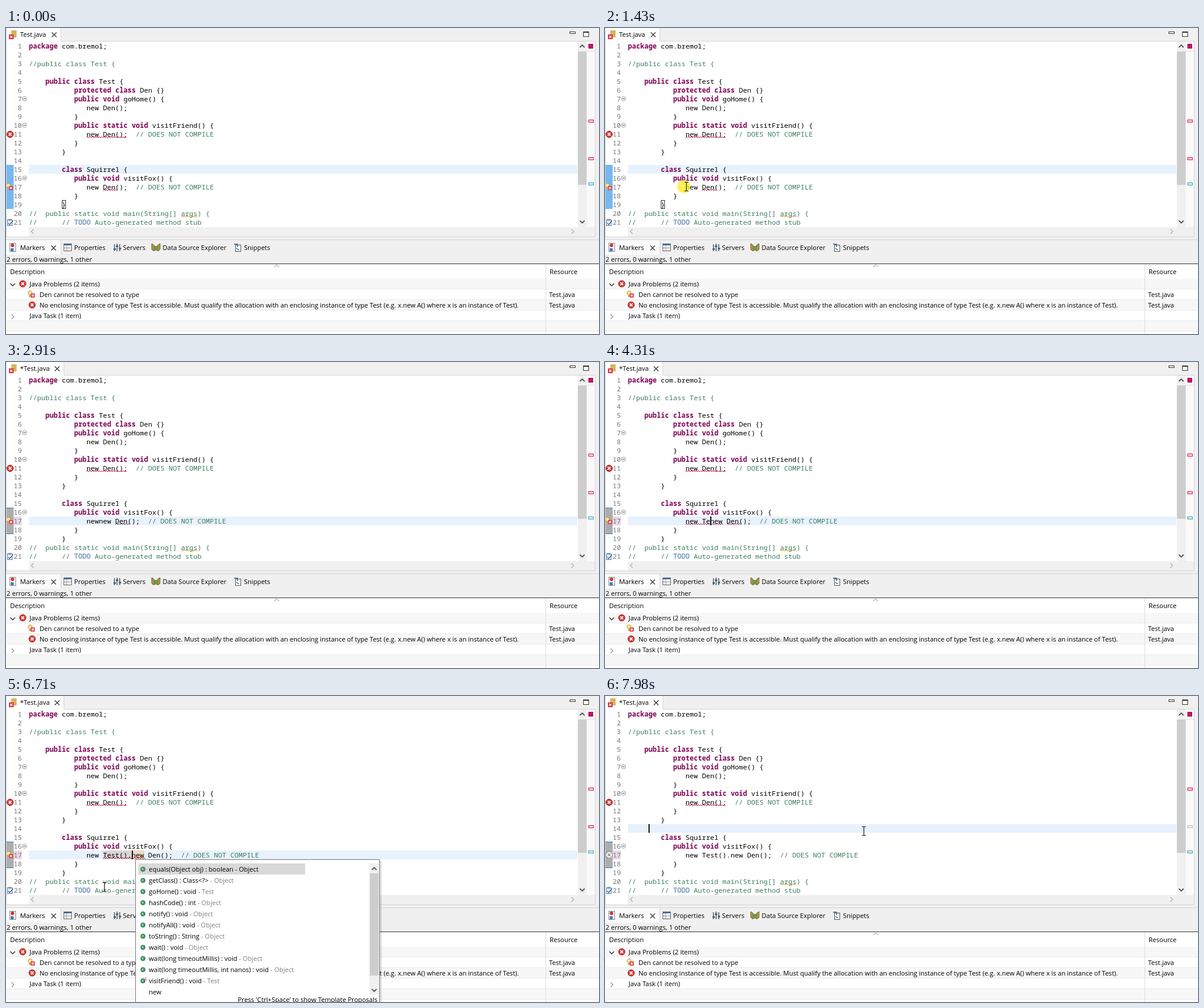
Recreate the animation shown at these times as an HTML page. Size 1009 by 521 pixels, loop 8 s.

```html
<!DOCTYPE html>
<html lang="en">
<head>
<meta charset="utf-8">
<title>Editor</title>
<style>
html, body { margin: 0; width: 100%; height: 100%; overflow: hidden; background: #f0f0f0; }
svg { display: block; width: 100vw; height: 100vh; }
text { white-space: pre; font: 11.05px "Open Sans", "Noto Sans", sans-serif; fill: #000; }
.m { font: 11.667px "Noto Sans Mono", "DejaVu Sans Mono", monospace; }
.k { font-weight: 700; fill: #7f0055; }
.c { fill: #3f7f5f; }
.todo { fill: #7f9fbf; font-weight: 700; }
.g { fill: #808080; }
.n { fill: #787878; }
.i { font-style: italic; }
</style>
</head>
<body>
<svg id="stage" viewBox="0 0 1009 521" preserveAspectRatio="none"></svg>
<script>
const LOOP = 8000, RED = '#d4145a';
const stage = document.getElementById('stage');

const esc = s => s.replace(/&/g, '&amp;').replace(/</g, '&lt;');
const span = (cls, s) => `<tspan class="${cls}">${s}</tspan>`;
const text = (x, y, s, cls = '', more = '') => `<text x="${x}" y="${y}" class="${cls}" ${more}>${s}</text>`;
const rect = (x, y, w, h, fill, stroke = 'none') =>
  `<rect x="${x}" y="${y}" width="${w}" height="${h}" fill="${fill}" stroke="${stroke}"/>`;
const path = (d, stroke, w = 1, fill = 'none') =>
  `<path d="${d}" stroke="${stroke}" stroke-width="${w}" fill="${fill}"/>`;
const disc = (x, y, r, fill, stroke = 'none') =>
  `<circle cx="${x}" cy="${y}" r="${r}" fill="${fill}" stroke="${stroke}"/>`;
const cross = (x, y, r, color, w) => path(`M${x - r} ${y - r}l${2 * r} ${2 * r}m0 ${-2 * r}l${-2 * r} ${2 * r}`, color, w);
const chevron = (x, y, dx, dy, color, w = 1.4) => // points towards (dx, dy)
  path(`M${x - 2 * dx - 4 * dy} ${y - 2 * dy - 4 * dx}L${x + 2 * dx} ${y + 2 * dy}L${x - 2 * dx + 4 * dy} ${y - 2 * dy + 4 * dx}`, color, w);
const squiggle = (x1, x2, y, color) => {
  let d = `M${x1} ${y}`;
  for (let x = x1; x < x2; x += 4) d += 'l2 -2l2 2';
  return path(d, color);
};

const rowTop = n => 8 + 15 * n;
const col = c => 39 + 7 * c;

const CODE = `package com.bremol;

//public class Test {

    public class Test {
           protected class Den {}
           public void goHome() {
              new Den();
           }
           public static void visitFriend() {
              new Den();  // DOES NOT COMPILE
           }
        }

        class Squirrel {
           public void visitFox() {
              @new Den();  // DOES NOT COMPILE
           }
        }
//  public static void main(String[] args) {
//      // TODO Auto-generated method stub`.split('\n');

const paint = s => s.replace(/\/\/.*|\b(?:package|public|protected|static|class|void)\b/g,
  m => m[0] === '/' ? span('c', m.replace('TODO', span('todo', 'TODO'))) : span('k', m));

// Time at which each character of the insertion is typed
const TYPED = 'new Test().';
const KEYS = [2230, 2300, 2370, 3380, 4040, 4310, 4510, 4710, 6050, 6240, 6570];
const typedCount = t => KEYS.filter(k => k <= t).length;

// Popup opens, its documentation opens, the code is checked again, popup closes
const POPUP = 6710, DOCS = 7180, CHECKED = 7250, CLOSED = 7790;

const PROPOSALS = ['equals(Object obj) : boolean - Object', 'getClass() : Class<?> - Object', 'goHome() : void - Test',
  'hashCode() : int - Object', 'notify() : void - Object', 'notifyAll() : void - Object', 'toString() : String - Object',
  'wait() : void - Object', 'wait(long timeoutMillis) : void - Object',
  'wait(long timeoutMillis, int nanos) : void - Object', 'visitFriend() : void - Test', 'new'];

// `code` and *emphasis*; a leading dash is a bullet
const DOC = [[292, 'Indicates whether some other object is "equal to" this one.'],
  [320, 'The `equals` method implements an equivalence relation on non-null object'],
  [336, 'references:'],
  [364, '-It is *reflexive*: for any non-null reference value `x`, `x.equals(x)` should'],
  [381, ' return `true`.'],
  [398, '-It is *symmetric*: for any non-null reference values `x` and `y`, `x.equals(y)`'],
  [414, ' should return `true` if and only if `y.equals(x)` returns `true`.'],
  [431, '-It is *transitive*: for any non-null reference values `x`, `y`, and `z`, if `x.equals`'],
  [447, ' `(y)` returns `true` and `y.equals(z)` returns `true`, then `x.equals(z)`'],
  [464, ' should return `true`.'],
  [480, '-It is *consistent*: for any non-null reference values `x` and `y`, multiple'],
  [497, ' invocations of `x.equals(y)` consistently return `true` or consistently'],
  [513, ' return `false`, provided no information used in `equals` comparisons']];

// Pointer way points: time, x, y
const WAY = [[110, 352, 490], [330, 300, 420], [600, 215, 250], [870, 170, 214], [1080, 150, 245], [1360, 138, 270],
  [1530, 138, 270], [1640, 167, 325], [7040, 167, 325], [7320, 330, 160], [7460, 420, 130], [7700, 441, 230], [7850, 440, 230]];

function pointerAt(t) {
  if (t < 110 || (t >= 2230 && t < POPUP)) return null;
  t = 110 + Math.floor((t - 110) / 69 + 0.02) * 69;
  const i = WAY.findIndex(p => p[0] > t);
  if (i < 0) return [440, 230];
  const a = WAY[Math.max(0, i - 1)], b = WAY[i];
  const u = Math.max(0, (t - a[0]) / (b[0] - a[0])), e = u * u * (3 - 2 * u);
  return [1, 2].map(k => Math.round(a[k] + (b[k] - a[k]) * e));
}

const errorIcon = (x, y, r = 5.5) => disc(x, y, r, '#d63a34', '#a82020') + cross(x, y, r * 0.42, '#fff', 1.7);
const bulbError = (x, y) => disc(x - 2, y - 2, 3.5, '#fbe3a0', '#c8963c') + rect(x - 4, y + 2, 4, 3, '#c8a870') +
  rect(x - 1, y - 1, 7, 7, '#dc3c3c') + cross(x + 2.5, y + 2.5, 1.8, '#fff', 1.3);

function tabBar(dirty) {
  const w = dirty ? 98 : 93;
  return rect(0, 0, 1009, 23, '#f0f0f0') + rect(0, 0, w, 23, '#fff') +
    path(`M${w + .5} 0V22.5H1002.5V355.5H.5V0`, '#d5d5d5') +
    rect(9, 4, 9, 12, '#d9b45c') + rect(5, 11, 8, 8, '#d8283c') + cross(9, 15, 2, '#fff', 1.4) +
    text(24, 15, (dirty ? '*' : '') + 'Test.java') + cross(w - 11, 11.5, 4, '#333', 1.2) +
    rect(959.5, 6.5, 9, 3, '#fff', '#333') + rect(982.5, 6.5, 9, 8, '#fff', '#333') + rect(982, 6, 10, 2, '#333');
}

function gutter(t) {
  let s = t < 2030 ? rect(1, 233, 12, 75, 'url(#blue)')
    : rect(1, 248, 12, 45, 'url(#gray)') + path('M1 248.5h12M1 292.5h12', '#1e82d2');
  if (t >= KEYS[0]) s += rect(13, 263, 14, 15, '#e8d9e6');
  CODE.forEach((_, i) => s += text(27, rowTop(i + 1) + 12, i + 1, 'm n', 'text-anchor="end"'));
  for (const n of [7, 10, 16])
    s += disc(31.5, rowTop(n) + 7.5, 3.6, '#fff', '#8c9aa6') + path(`M29.5 ${rowTop(n) + 7.5}h4`, '#555');
  s += errorIcon(7, 181);
  s += t < CHECKED ? bulbError(6, 270) : disc(7, 270.5, 5.5, '#f4f4f4', '#888') + cross(7, 270.5, 2.3, '#777', 1.2);
  s += rect(2.5, 326.5, 8, 10, '#e9f1fa', '#5a7fa8') + rect(4, 325, 5, 3, '#8a9aa8') + path('M4 332l2 3l6-7', '#2a62a0', 1.3);
  return s;
}

// Error underlines on the line being typed
function underlines(t) {
  if (t >= CHECKED) return '';
  const n = typedCount(t), end = col(14 + n + 3), den = n ? end + 7 : 165;
  let s = '';
  if (t < 5650) s += squiggle(den, den + 21, 277, n && t < 3380 ? '#555' : RED);
  if (t >= 3110) s += squiggle(t < 5650 ? 137 : 165, end, 277, RED);
  return s;
}

function caret(t) {
  if (t >= 7980) return rect(74, 218, 2, 15, '#111');
  if (t < 1530 || t >= CLOSED) return '';
  const n = typedCount(t);
  const on = n ? t - KEYS[n - 1] < 530 || t >= 7630 : t < 1960;
  return on ? rect(col(14 + n), 263, 2, 15, t > 7600 ? '#2222b0' : '#111') : '';
}

function editor(t) {
  const active = t < 1530 ? 15 : t < 7850 ? 17 : 14;
  const typed = TYPED.slice(0, typedCount(t));
  let s = rect(1, 23, 1001, 332, '#fff') + rect(39, rowTop(active), 933, 15, '#e8f2fe') + gutter(t);
  if (t >= POPUP && t < 7040) s += rect(165, 263, 49, 15, '#d6d6d6') + rect(214, 263, 21, 15, '#ead9c4');
  const flash = t >= CHECKED && t < CLOSED;
  if (flash) s += rect(214, 263, 21, 15, '#ff0');
  CODE.forEach((line, i) => {
    const shown = paint(line.replace('@', typed));
    s += text(39, rowTop(i + 1) + 12, flash && i === 16 ? shown.replace('.new', '.<tspan fill="#c83c00">new</tspan>') : shown, 'm');
  });
  s += squiggle(137, 203, 187, RED) + underlines(t) + squiggle(298, 326, 322, '#e0a030');
  if (t < 1530) s += rect(95.5, 293.5, 6, 14, 'none', '#333');
  s += caret(t);
  // Scroll bars and overview ruler
  s += rect(973, 23, 15, 316, '#f0f0f0') + rect(973, 40, 15, 227, '#cdcdcd') +
    chevron(980.5, 31, 0, -1, '#555', 1.8) + chevron(980.5, 330, 0, 1, '#555', 1.8) +
    rect(39, 339, 934, 16, '#f0f0f0') + rect(973, 339, 29, 16, '#f0f0f0') + rect(988, 23, 14, 316, '#fafafa') +
    chevron(45, 346.5, -1, 0, '#b4b4b4') + chevron(964, 346.5, 1, 0, '#b4b4b4') +
    path('M988 39.5h14', '#e0e0e0') + rect(991.5, 27.5, 7, 7, '#c8106c', '#a00c58') +
    rect(991.5, 156.5, 8, 4, '#ffd2e2', RED) +
    rect(991.5, 220.5, 8, 4, ...(t < CHECKED ? ['#ffd2e2', RED] : ['#eee', '#bbb'])) +
    rect(991.5, 263.5, 8, 4, '#d2f2f6', '#3fa0b4');
  return s;
}

function panel(hover) {
  let s = rect(0, 356, 1009, 165, '#f0f0f0') + rect(0, 361, 93, 25, '#fafafa') +
    path('M0 360.5H1009M93.5 361V386', '#d5d5d5') + rect(0, 402, 1009, 119, '#fff') + path('M0 401.5H1009', '#333');
  for (let i = 0; i < 6; i++) {
    const y = 427 + 18 * i;
    const fill = i === hover ? '#e5f3ff' : i % 2 ? '#fff' : '#f7f7f7';
    s += rect(1, y, 1008, 18, fill) + path(`M1 ${y + 17.5}H1009`, '#ececec');
  }
  s += path('M918.5 402V521', '#dcdcdc') + chevron(460.5, 405, 0, -1, '#777', 1);
  // Tab icons
  s += rect(6.5, 366.5, 10, 14, '#fff', '#889') + disc(11, 370, 3, '#d03038') + rect(8, 375, 5, 5, '#4a78b4') +
    rect(98.5, 367.5, 13, 12, '#fff', '#666') + rect(98, 367, 14, 3, '#4a6a9a') + path('M103.5 370v9M99 374.5h12', '#999') +
    path('M184.5 368v12M189 367v13M193.5 368v12', '#444', 1.3) + rect(183, 375, 4, 3, '#46688c') + rect(187, 370, 4, 3, '#46688c') + rect(192, 374, 4, 3, '#46688c') +
    path('M248 367l4 3v10l-4-3zM262 367l-4 3v10l4-3z', '#6a5420', 1, '#c09a3c') + rect(252, 371, 6, 8, '#6a9a58') +
    rect(390.5, 369.5, 9, 11, '#fff', '#555') + path('M388 368h6v5M392 375l4 3', '#3264a0', 1.5);
  s += text(24, 378, 'Markers') + cross(81, 374.5, 4, '#333', 1.2) + text(116, 378, 'Properties') + text(199, 378, 'Servers') +
    text(266.5, 378, 'Data Source Explorer') + text(405, 378, 'Snippets') + text(1, 398, '2 errors, 0 warnings, 1 other') +
    text(7, 419, 'Description') + text(925, 419, 'Resource') +
    chevron(11.5, 437, 0, 1, '#333') + errorIcon(28.5, 435.5) + text(40, 440, 'Java Problems (2 items)') +
    bulbError(43, 453) + text(57, 458, 'Den cannot be resolved to a type') + text(924, 458, 'Test.java') +
    errorIcon(44.5, 471.5) + text(57, 476, 'No enclosing instance of type Test is accessible. Must qualify the allocation with an enclosing instance of type Test (e.g. x.new A() where x is an instance of Test).') +
    text(924, 476, 'Test.java') + chevron(11.5, 491.5, 1, 0, '#999') + text(40, 494, 'Java Task (1 item)');
  return s;
}

function proposals() {
  let s = rect(222, 281, 417, 240, '#0002') + rect(220.5, 278.5, 415, 250, '#fff', '#777') + rect(225, 285, 284, 19, '#d9d9d9');
  PROPOSALS.forEach((p, i) => {
    const y = 295 + 19 * i, [head, owner] = p.split(' - ');
    if (owner) s += disc(233, y, 3.8, '#4f9a6c', '#2f7350') + disc(232.4, y - .6, 1.5, '#9fd0b0');
    if (i === 10) s += text(236, y - 1, 'S', '', 'style="font-size:7px;fill:#a33"');
    s += text(243, y + 4, esc(head) + (owner ? span(i ? 'g' : '', ' - ' + owner) : ''));
  });
  return s + rect(618, 285, 16, 224, '#f0f0f0') + rect(619, 302, 15, 174, '#cdcdcd') +
    chevron(626.5, 294, 0, -1, '#555', 1.8) + chevron(626.5, 501, 0, 1, '#555', 1.8) +
    text(632, 521, "Press 'Ctrl+Space' to show Template Proposals", '', 'text-anchor="end"');
}

function docs() {
  let s = rect(641.5, 278.5, 400, 260, '#ffffe1', '#777');
  for (const [y, line] of DOC) {
    const inset = /^[- ]/.test(line);
    if (line[0] === '-') s += disc(659, y - 4, 2, '#000');
    s += text(inset ? 670 : 646, y, (inset ? line.slice(1) : line)
      .replace(/`(.*?)`/g, (_, c) => span('m', c)).replace(/\*(.*?)\*/g, (_, c) => span('i', c)));
  }
  return s + rect(642, 516, 367, 5, '#ffffe1') + path('M642 515.5H1009', '#d8d8c0') +
    text(822, 527, "Press 'Tab' from proposal table or click for focus", 'g');
}

function pointer([x, y], t) {
  const overPopup = t >= POPUP && t < CLOSED && x > 220 && y > 278;
  let s = '';
  if ((t >= 1400 && t < 1600) || (t >= CLOSED && t < 7980)) s += disc(x - 4, y, 11, '#ffee28cc');
  return s + (y < 339 && !overPopup
    ? path(`M${x - 3} ${y - 7.5}h2.5l1 1l1-1h2.5M${x + .5} ${y - 7}v14M${x - 3} ${y + 7.5}h2.5l1-1l1 1h2.5`, '#222', 1.2)
    : path(`M${x} ${y}v16l4-4l3 6l2-1l-3-6h5z`, '#000', 1, '#fff'));
}

const check = (id, a, b) => `<pattern id="${id}" width="2" height="2" patternUnits="userSpaceOnUse">` +
  rect(0, 0, 2, 2, a) + rect(0, 0, 1, 1, b) + rect(1, 1, 1, 1, b) + '</pattern>';
const DEFS = '<defs>' + check('blue', '#d8ecff', '#1684e0') + check('gray', '#f4f4f4', '#666') + '</defs>';

function scene(t) {
  const p = pointerAt(t), hover = p && p[1] > 427 ? Math.floor((p[1] - 427) / 18) : -1;
  return DEFS + rect(0, 0, 1009, 521, '#f0f0f0') + editor(t) + tabBar(t >= KEYS[0]) + panel(hover) +
    (t >= POPUP && t < CLOSED ? proposals() : '') + (t >= DOCS && t < CLOSED ? docs() : '') + (p ? pointer(p, t) : '');
}

let shown = '';
function tick() {
  const next = scene(performance.now() % LOOP);
  if (next !== shown) stage.innerHTML = shown = next;
  requestAnimationFrame(tick);
}
tick();
</script>
</body>
</html>
```
